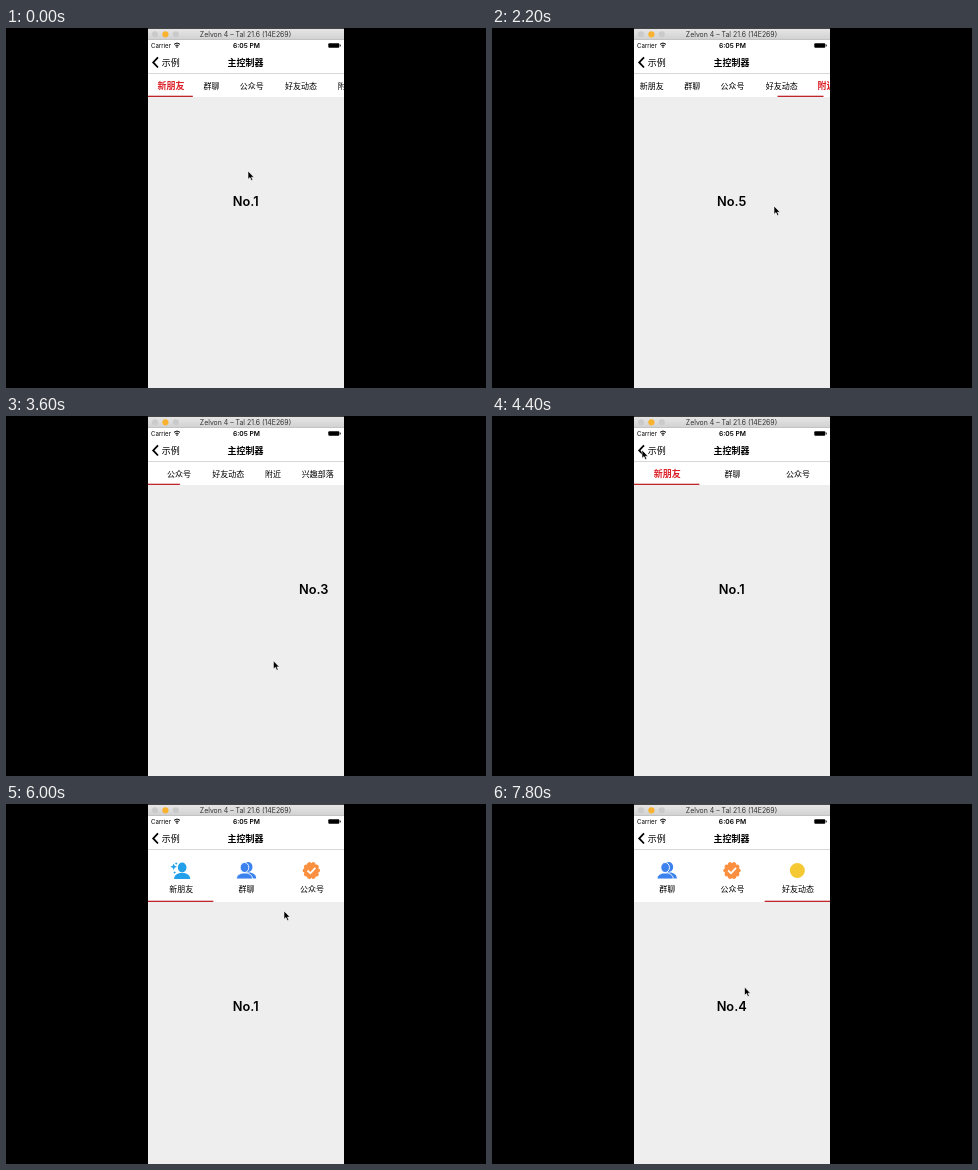
Animation of 480 by 360 pixels, one loop 8000 ms. Source, as an HTML page:

```html
<!DOCTYPE html>
<html lang="zh">
<head>
<meta charset="utf-8">
<style>
  html, body { margin: 0; width: 100%; height: 100%; overflow: hidden; background: #000; }
  svg { display: block; width: 480px; height: 360px; }
  text { font-family: Inter, "Noto Sans CJK SC", "Noto Sans CJK", sans-serif; text-anchor: middle; }
  .tab { font-size: 8px; font-weight: 500; }
  .active { font-size: 9px; font-weight: 700; fill: #dc2028; }
  .page { font-size: 12.8px; font-weight: 600; }
</style>
</head>
<body>
<svg viewBox="0 0 480 360">
  <defs>
    <clipPath id="screen"><rect x="142" width="196" height="360"/></clipPath>
    <linearGradient id="chrome" x2="0" y2="1">
      <stop stop-color="#e6e6e6"/><stop offset="1" stop-color="#d0d0d0"/>
    </linearGradient>
    <g id="person">
      <ellipse cy="-3" rx="4.3" ry="5"/>
      <path d="M-8 8.5C-8 4.5-5 3.5-2.5 2.5H2.5C5 3.5 8 4.5 8 8.5Z"/>
    </g>
    <path id="sparkle" d="M0-3.3L1-1 3.3 0 1 1 0 3.3-1 1-3.3 0-1-1Z"/>
    <g id="friend" fill="#22a0ea">
      <use href="#person" x="1.5"/>
      <use href="#sparkle" x="-7" y="-3.7"/>
      <use href="#sparkle" transform="translate(-4.5 -7) scale(.45)"/>
      <use href="#sparkle" transform="translate(-6 2) scale(.45)"/>
    </g>
    <g id="group" fill="#3b82ee">
      <use href="#person" x="2.2" y="-.5"/>
      <use href="#person" x="-1.5" stroke="#fff" stroke-width=".9"/>
    </g>
    <g id="badge">
      <g id="scallops" fill="#fa9040"></g>
      <path d="M-3.8 0L-1 2.8 4-2.6" fill="none" stroke="#fff" stroke-width="1.8"/>
    </g>
    <circle id="feed" r="7.5" fill="#f5c934"/>
  </defs>
  <g clip-path="url(#screen)">
    <rect x="142" width="196" height="360" fill="#eee"/>
    <g id="pages"></g>
    <g id="tabs"></g>
    <rect x="142" y="12" width="196" height="33" fill="#fff"/>
    <rect x="142" y="45" width="196" height="1" fill="#d8d8d8"/>
    <rect x="142" width="196" height="12" fill="#000"/>
    <rect x="142" y=".7" width="196" height="11.3" fill="url(#chrome)"/>
    <rect x="142" y="11.5" width="196" height=".5" fill="#b5b5b5"/>
    <circle cx="149" cy="6.3" r="3" fill="#cacaca"/>
    <circle cx="159.4" cy="6.3" r="3.1" fill="#fab32f"/>
    <circle cx="169.8" cy="6.3" r="3" fill="#cacaca"/>
    <text x="239.5" y="9.1" font-size="6.9" fill="#333">Zelvon 4 – Tal 21.6 (14E269)</text>
    <text x="155" y="19.8" font-size="6.1">Carrier</text>
    <path d="M168 16.3Q171 13.7 174 16.3M169.3 17.8Q171 16.3 172.7 17.8" fill="none" stroke="#000"/>
    <circle cx="171" cy="19.1" r=".8"/>
    <text id="clock" x="240.5" y="20" font-size="6.7" font-weight="600"></text>
    <rect x="322.3" y="15.3" width="11" height="4.4" rx="1"/>
    <rect x="333.8" y="16.6" width=".9" height="1.8"/>
    <path d="M152 29.3L147.2 34.4 152 39.5" fill="none" stroke="#000" stroke-width="1.8"/>
    <text x="164.7" y="37.5" font-size="9" font-weight="500">示例</text>
    <text x="239.6" y="37.5" font-size="9" font-weight="700">主控制器</text>
    <path id="cursor" d="M0 0V8.3L2 6.6 3.3 9.6 4.8 9 3.5 6.2H6Z" stroke="#fff" stroke-width=".6"/>
  </g>
</svg>
<script>
const LOOP = 8000, STEP = 200, LEFT = 142, WIDTH = 196;
const PAGE_MS = 400, LINE_MS = 280, SCROLL_MS = 200, SETTLE_MS = 500;
const labels = ["新朋友", "群聊", "公众号", "好友动态", "附近", "兴趣部落"];
const icons = ["friend", "group", "badge", "feed"];

// Each move is [start time, page to go to].
const scenes = [
  { start: 0, tabs: layout(labels, s => 18.4 + 8.8 * s.length),
    moves: [[300, 1], [913, 2], [1420, 3], [1752, 4], [2500, 5],
      [2700, 4], [2900, 3], [3130, 2], [3547, 1], [3850, 0]] },
  { start: 4400, tabs: layout(labels, () => WIDTH / 3), moves: [[4700, 1], [5420, 2]] },
  { start: 5800, tabs: layout(labels.slice(0, icons.length), () => WIDTH / 3), icons: true,
    moves: [[6000, 1], [6560, 2], [7110, 3]] },
];
const cursorPath = [[0, 242, 143], [1400, 284, 175], [2200, 282, 178], [3600, 267.4, 244.7],
  [4400, 150, 34], [5400, 295.5, 56.5], [6800, 251, 184.5], [7800, 252.5, 183]];

const $ = id => document.getElementById(id);
const mix = (a, b, p) => a + (b - a) * p;
const clamp = (v, low, high) => Math.min(Math.max(v, low), high);
const easeOut = p => 1 - (1 - clamp(p, 0, 1)) ** 3;
const smooth = p => p * p * (3 - 2 * p);

function layout(names, widthOf) {
  let x = 0;
  return names.map(label => {
    const w = widthOf(label);
    x += w;
    return { label, w, x: x - w };
  });
}

const pageAt = (moves, t) =>
  moves.reduce((page, [start, to]) => mix(page, to, easeOut((t - start) / PAGE_MS)), 0);

// The underline follows at once when going back, but waits for the page when going on.
const lineAt = (moves, t) => moves.reduce((line, [start, to], i) => {
  const lag = i && to < moves[i - 1][1] ? 0 : PAGE_MS;
  return mix(line, to, easeOut((t - start - lag) / LINE_MS));
}, 0);

// The bar centres a tab only after the pages have rested on it.
function scrollAt({ tabs, moves }, t) {
  const last = tabs[tabs.length - 1], limit = last.x + last.w - WIDTH;
  return moves.reduce((scroll, [start, to], i) => {
    if (i + 1 < moves.length && moves[i + 1][0] - start < SETTLE_MS) return scroll;
    const target = clamp(tabs[to].x + (tabs[to].w - WIDTH) / 2, 0, limit);
    return mix(scroll, target, easeOut((t - start - SETTLE_MS) / SCROLL_MS));
  }, 0);
}

function tabBar(scene, t) {
  const { tabs, moves } = scene;
  const bottom = scene.icons ? 98 : 69, baseline = scene.icons ? 88.2 : 60.6;
  const left = LEFT - scrollAt(scene, t), line = lineAt(moves, t);
  const selected = moves.reduce((page, [start, to]) => t >= start ? to : page, 0);
  const items = tabs.map(({ label, x, w }, i) => {
    const cx = left + x + w / 2, active = i === selected && !scene.icons;
    const icon = scene.icons ? `<use href="#${icons[i]}" x="${cx}" y="66.5"/>` : "";
    return `${icon}<text class="tab ${active ? "active" : ""}" x="${cx + .6}" y="${baseline}">${label}</text>`;
  });
  const from = tabs[Math.floor(line)], to = tabs[Math.ceil(line)], p = line % 1;
  return `<rect x="${LEFT}" y="45" width="${WIDTH}" height="${bottom - 45}" fill="#fff"/>${items.join("")}
    <rect x="${left + mix(from.x, to.x, p)}" y="${bottom - 1.3}"
      width="${mix(from.w, to.w, p)}" height="1.3" fill="#c0272d"/>`;
}

function cursorAt(t) {
  const i = cursorPath.findIndex(([time]) => time > t);
  if (i < 0) return cursorPath[cursorPath.length - 1].slice(1);
  const [t0, x0, y0] = cursorPath[i - 1], [t1, x1, y1] = cursorPath[i];
  const p = smooth((t - t0) / (t1 - t0));
  return [mix(x0, x1, p), mix(y0, y1, p)];
}

function render(t) {
  const scene = scenes.filter(s => s.start <= t).pop();
  const page = pageAt(scene.moves, t), y = scene.icons ? 207.4 : 178.4;
  $("pages").innerHTML = scene.tabs.map((_, i) =>
    `<text class="page" x="${239.7 + (i - page) * WIDTH}" y="${y}">No.${i + 1}</text>`).join("");
  $("tabs").innerHTML = tabBar(scene, t);
  $("clock").textContent = t < 7200 ? "6:05 PM" : "6:06 PM";
  $("cursor").setAttribute("transform", `translate(${cursorAt(t)})`);
}

$("scallops").innerHTML = '<circle r="7.4"/>' + Array.from({ length: 10 }, (_, i) =>
  `<circle cx="6.6" r="2.1" transform="rotate(${i * 36})"/>`).join("");

let shown = -1;
function tick() {
  const t = Math.floor(performance.now() % LOOP / STEP) * STEP;
  if (t !== shown) render(shown = t);
  requestAnimationFrame(tick);
}
tick();
</script>
</body>
</html>
```
